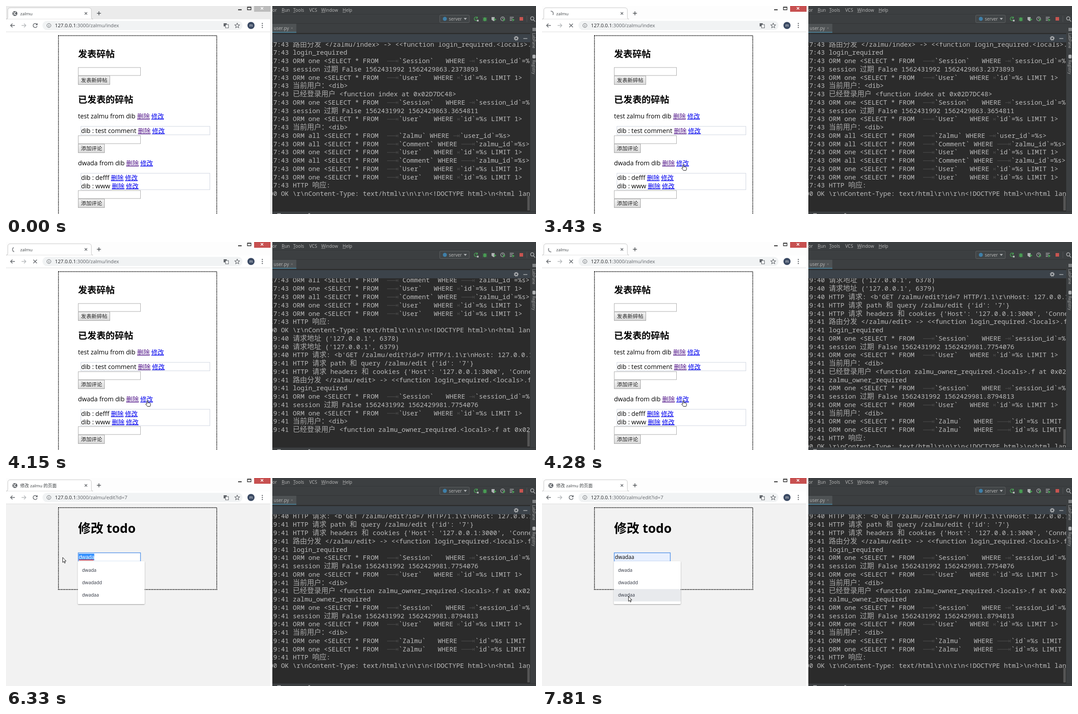
An HTML page that plays this animation: 1192 by 470 pixels, repeating every 8 s.

```html
<!DOCTYPE html>
<html lang="zh-CN">
<head>
<meta charset="utf-8">
<style>
  html, body { margin: 0; width: 100%; height: 100%; overflow: hidden; background: #fff }
  svg { display: block; width: 1192px; height: 470px }
  text { white-space: pre; font-family: "Open Sans", "Noto Sans CJK SC", "Noto Sans CJK", sans-serif }
  .mono { font-family: "Noto Sans Mono", "Noto Sans CJK SC", "Noto Sans CJK", monospace; font-size: 14.6px; fill: #bbb }
  .mono tspan { font-size: 16px; font-weight: 300; fill: #aaa }
  .arial { font-family: "Liberation Sans", Arial, sans-serif }
  .link { text-decoration: underline }
</style>
</head>
<body>
<svg id="stage" viewBox="0 0 1192 470"></svg>
<script>
const $ = id => document.getElementById(id);
const esc = s => s.replace(/&/g, '&amp;').replace(/</g, '&lt;');
const text = (x, y, s, size, fill = '#000', more = '') =>
  `<text x="${x}" y="${y}" font-size="${size}" fill="${fill}" ${more}>${esc(s)}</text>`;
const rect = (x, y, w, h, fill, more = '') =>
  `<rect x="${x}" y="${y}" width="${w}" height="${h}" fill="${fill}" ${more}/>`;
const line = (d, stroke, width = 1, more = '') =>
  `<path d="${d}" fill="none" stroke="${stroke}" stroke-width="${width}" ${more}/>`;
const shape = (d, fill, more = '') => `<path d="${d}" fill="${fill}" ${more}/>`;
const disc = (x, y, r, fill, more = '') => `<circle cx="${x}" cy="${y}" r="${r}" fill="${fill}" ${more}/>`;
const group = (id, body, more = '') => `<g id="${id}" ${more}>${body}</g>`;

// Browser window
const GREY = '#5f6368';
const browser = () =>
  rect(0, 0, 599, 470, '#fdfdfd', 'id="frame"') +
  line('M522 8.5h8', '#222', 2) + line('M543 2.5h8v6h-8zM543 3h8', '#222', 1.3) +
  rect(558, 0, 37, 13, '#c75050', 'id="close"') + line('M573 2.5l5.5 5.5m0-5.5l-5.5 5.5', '#fff', 1.5) +
  shape('M0 30q4 0 4-4V10q0-6 6-6H186q6 0 6 6V26q0 4 4 4z', '#fff', 'stroke="#b4b4b4" stroke-width=".8"') +
  rect(0, 30, 594, 29, '#fff') + line('M0 58.5H594', '#dcdcdc') +
  group('globe', disc(20, 17, 5.6, GREY) + line('M16 15l4 1 2-3M17 20l2-2 4 2', '#fff', 1.5)) +
  group('loader', disc(20, 17, 5.4, 'none', 'stroke="#85888c" stroke-width="1.9" stroke-dasharray="12.2 40"')) +
  text(32, 21, '', 9.8, '#3c4043', 'id="title"') +
  line('M177 14l5.5 5.5m0-5.5l-5.5 5.5', GREY, 1.3) + line('M204.5 16.5h9m-4.5-4.5v9', '#45494d', 1.4) +
  line('M20 44H10.5m4-4.2L10.3 44l4.2 4.2', GREY, 1.5) + line('M35 44h9.5m-4-4.2l4.2 4.2-4.2 4.2', '#b5b8bb', 1.5) +
  group('reload', line('M69.5 41.5a4.6 4.6 0 1 0 .5 4', GREY, 1.5) + shape('M71 38.5v4.7h-4.7z', GREY)) +
  group('stop', line('M61.5 40l8 8m0-8l-8 8', GREY, 1.5)) +
  rect(82, 33.5, 450, 21, '#f1f3f4', 'rx="10.5"') +
  disc(96.5, 44, 4.5, 'none', `stroke="${GREY}"`) + line('M96.5 43.5v3m0-5v1', GREY, 1.2) +
  text(110, 48, '127.0.0.1', 11.2, '#202124') + text(157.3, 48, '', 11.2, GREY, 'id="path"') +
  rect(489.5, 39, 7, 7, GREY) + rect(493.5, 42, 7, 7.5, '#f1f3f4', `stroke="${GREY}"`) +
  line('M520 38.8l1.6 3.5 3.8.4-2.9 2.6.9 3.8-3.4-2-3.4 2 .9-3.8-2.9-2.6 3.8-.4z', GREY, 1.1) +
  disc(551, 44, 8, '#3c4b64') + text(547.3, 47, 'm', 8.5, '#fff') +
  [39.5, 44, 48.5].map(y => disc(576.5, y, 1.3, GREY)).join('');

// Web pages
const link = (x, y, s, visited) => text(x, y, s, 14.2, visited ? '#551a8b' : '#0000ee', 'class="link"');
const entry = (x, y, s, linkX, visited) =>
  text(x, y, s, 14.2) + link(linkX, y, '删除', visited) + link(linkX + 31.7, y, '修改');
const field = y => rect(162.5, y + .5, 140, 18, '#fff', 'stroke="#a9a9a9"');
const button = (y, w, s) =>
  rect(162.5, y + .5, w, 19.5, 'url(#shade)', 'stroke="#a0a0a0"') + text(168.5, y + 14.8, s, 11.9, '#222');
const dotted = h => rect(118, 67, 356, h, 'none', 'stroke="#000" stroke-width="2" stroke-dasharray="1.8 1.8"');
const quote = (y, h) => rect(168.5, y + .5, 290, h, 'none', 'stroke="#cdd4df"');
const heading = (y, s, size) => text(162, y, s, size, '#000', 'font-weight="700"');

const listPage = () => group('list',
  rect(0, 59, 594, 411, '#fff') + dotted(420) +
  heading(116, '发表碎帖', 20.7) + field(138.5) + button(157.5, 71, '发表新碎帖') +
  heading(218.5, '已发表的碎帖', 20.7) +
  entry(162, 254, 'test zalmu from dib', 295, true) +
  quote(271.5, 19) + entry(169, 287, 'dib : test comment', 296.8, true) + field(292.5) + button(311.5, 59, '添加评论') +
  entry(162, 360, 'dwada from dib', 270.3, true) +
  quote(377.5, 37) + entry(169, 393, 'dib : defff', 236, false) + entry(169, 411.5, 'dib : www', 238, false) +
  field(416.5) + button(435.5, 59, '添加评论'));

const choices = ['dwada', 'dwadadd', 'dwadaa'];
const editPage = () => group('edit',
  rect(0, 59, 594, 411, '#f2f2f2') + dotted(185) + heading(124, '修改 todo', 28.4) +
  rect(162.5, 169, 140, 19.5, '#fff', 'id="box"') +
  rect(163.5, 171, 35, 15, '#3390ff', 'id="marked"') +
  text(164, 182.7, 'dwada', 11.9, '#000', 'id="value" class="arial"') +
  line('M164 186' + 'l1.5-1.4 1.5 1.4'.repeat(11), '#e02020', 1.2, 'id="wavy"') +
  text(164, 182.7, '', 11.8, '#000', 'id="preview"') +
  group('menu', rect(161.5, 188, 150.5, 97, '#fff', 'rx="2" filter="url(#shadow)"') +
    rect(161.5, 0, 150.5, 28, '#e8eaed', 'id="hover"') +
    choices.map((s, i) => text(171, 212 + 28.2 * i, s, 10.35, '#2f3440')).join('')));

// IDE window
const queries = {
  S: ['one', 'Session', 989, 1055, '`session_id`=%s LIMIT 1>'],
  U: ['one', 'User', 962, 1021, '`id`=%s LIMIT 1>'],
  A: ['all', 'Zalmu', 953, 1021, '`user_id`=%s>'],
  C: ['all', 'Comment', 971, 1055, '`zalmu_id`=%s>'],
  W: ['one', 'Zalmu', 971, 1055, '`id`=%s LIMIT 1>'],
};
const session = tail => 'session 过期 False 1562431992 15624' + tail;
const user = '当前用户：<dib>', reply = 'HTTP 响应:';
const ok = '00 OK \\r\\nContent-Type: text/html\\r\\n\\r\\n<!DOCTYPE html>\\n<html lang="en">';
const route = page => `路由分发 </zalmu/${page}> -> <<function login_required.<locals>.f`;
const log = [
  route('index'), 'login_required', 'S', session('29863.2373893'), 'U', user,
  '已经登录用户 <function index at 0x02D7DC48>', 'S', session('29863.3654811'), 'U', user,
  'A', 'C', 'U', 'C', 'U', 'U', reply, ok,
  "请求地址 ('127.0.0.1', 6378)", "请求地址 ('127.0.0.1', 6379)",
  "HTTP 请求: <b'GET /zalmu/edit?id=7 HTTP/1.1\\r\\nHost: 127.0.0.1",
  "HTTP 请求 path 和 query /zalmu/edit {'id': '7'}",
  "HTTP 请求 headers 和 cookies {'Host': '127.0.0.1:3000', 'Connection'",
  route('edit'), 'login_required', 'S', session('29981.7754076'), 'U', user,
  '已经登录用户 <function zalmu_owner_required.<locals>.f at 0x02', 'zalmu_owner_required',
  'S', session('29981.8794813'), 'U', user, 'W', 'W', reply, ok,
];
const PITCH = 18.76;
const mono = (x, y, s) => `<text class="mono" x="${x}" y="${y}">` +
  esc(s).replace(/[\u3000-\uffff]+/g, '<tspan>$&</tspan>') + '</text>';
const tabMark = (x1, x2, y) => line(`M${x1} ${y}H${x2}m-3-2.5l3 2.5-3 2.5m4.5-5.5v6`, '#505050');
const logLine = (s, i) => {
  const y = 91.5 + PITCH * i, stamp = i < 19 ? '17:43' : i < 22 ? '19:40' : '19:41';
  if (s === ok) return mono(592.3, y, s);
  let body = mono(645, y, s);
  if (queries[s]) {
    const [kind, table, whereX, colX, col] = queries[s];
    body = mono(645, y, `ORM ${kind} <SELECT * FROM`) + tabMark(857, 880, y - 4.5) +
      mono(883, y, '`' + table + '`') + mono(whereX, y, 'WHERE') +
      tabMark(whereX + 53, colX - 3, y - 4.5) + mono(colX, y, col);
  }
  return mono(592.3, y, stamp) + body;
};
const side = (y, s) => text(0, 0, s, 8.6, '#b0b0b0', `transform="translate(1184 ${y}) rotate(90)"`);
const GREEN = '#499c54', PALE = '#afb1b3';
const ide = () =>
  rect(599, 0, 593, 470, '#3c3f41') +
  [['or', 599], ['Run', 620], ['Tools', 646], ['VCS', 682], ['Window', 709], ['Help', 757]]
    .map(([s, x]) => text(x, 12.8, s, 10, '#bbb')).join('') +
  line('M620 14.5h6m20 0h5m58 0h9m39 0h7', '#bbb', .7) + line('M599 18.5h593', '#333638') +
  rect(975.5, 20.5, 66.5, 17, '#414547', 'rx="2" stroke="#5e6162"') + disc(987, 29, 4.5, '#3f7fa8') +
  text(996, 32.8, 'server', 10, '#bbb') + shape('M1029.5 27h7l-3.5 4.5z', PALE) +
  line('M1060 26a4 4 0 1 0 .5 5', GREEN, 1.6) + shape('M1061 23.5v5h-5z', GREEN) + rect(1059, 31, 4, 4, PALE) +
  `<ellipse cx="1077" cy="30" rx="3.3" ry="4.5" fill="${GREEN}"/>` + line('M1072 26l10 8m0-8l-10 8m0-4h10', GREEN) +
  shape('M1092 25h7v9h-3l-4-3z', PALE) + shape('M1098 27l5 3.5-5 3.5z', GREEN) +
  disc(1117, 29, 4.3, 'none', `stroke="${PALE}" stroke-width="1.3"`) + line('M1117 26v3h2', PALE) +
  shape('M1118 28l5 3.5-5 3.5z', GREEN) +
  line('M1133 25.5h9m-9 3.5h6m-6 3.5h5', PALE, 1.4) + shape('M1139 28l5 3.5-5 3.5z', GREEN) +
  rect(1155, 25, 8, 8, '#c75450') + line('M1171.5 22v14', '#515456') +
  disc(1183.5, 28, 3.7, 'none', `stroke="${PALE}" stroke-width="1.5"`) + line('M1186 31l4 4', PALE, 1.6) +
  line('M599 39.5h593', '#323436') +
  rect(599, 40, 54, 20, '#4e5254') + rect(599, 58.5, 54, 2, '#4a7f96') +
  text(602, 54, 'user.py', 10, '#bbb') + line('M641 48l4 4m0-4l-4 4', '#777') +
  rect(599, 61, 580, 2.5, '#2b2b2b') + rect(599, 63.5, 580, 18.5, '#3c434a') +
  disc(1147.5, 73, 3, 'none', `stroke="${PALE}" stroke-width="2"`) +
  disc(1147.5, 73, 4.6, 'none', `stroke="${PALE}" stroke-width="1.5" stroke-dasharray="1.8 1.8"`) +
  line('M1163.5 73.5h9', PALE, 1.5) +
  rect(599, 82, 580, 382, '#2b2b2b') +
  group('log', group('scroll', log.map((s, i) => group('row' + i, logLine(s, i))).join('')), 'clip-path="url(#console)"') +
  rect(1172.5, 429, 5.5, 33, '#555', 'id="thumb"') +
  line('M1184 50.5h8m-8 2.5h8m-8 2.5h8', PALE, 1.3) + side(61, 'LabPane') +
  rect(1184, 110, 7, 8.5, PALE, 'rx="2"') + side(122, 'Registry') +
  line('M599 464.5h593', '#323436') + rect(610, 468.5, 8, 1.5, PALE) + rect(680, 468.5, 4, 1.5, PALE);

const OUTLINE = 'stroke="#000" stroke-width=".9"';
const cursors =
  group('arrow', shape('M.5.5v11.3l2.6-2.4 1.7 4 1.7-.8-1.7-3.9h3.4z', '#fff', OUTLINE)) +
  group('hand', shape('M-1 8V1q1-1.5 2 0v4l5 1q1 .5 1 2v3l-1 2.5H0L-3.5 9q-.5-2 1.5-1.5z', '#fff', OUTLINE)) +
  group('beam', line('M-2.5-5.5h2l.5.5.5-.5h2M0-5V5.5M-2.5 6h5', '#000'));

$('stage').innerHTML = `<defs>
  <linearGradient id="shade" x2="0" y2="1"><stop stop-color="#f3f3f3"/><stop offset="1" stop-color="#dadada"/></linearGradient>
  <filter id="shadow"><feDropShadow dx="0" dy="1" stdDeviation="1.2" flood-opacity=".4"/></filter>
  <clipPath id="console"><rect x="599" y="82" width="580" height="382"/></clipPath></defs>` +
  browser() + listPage() + editPage() + ide() + group('pointer', cursors);

// Motion
const LOOP = 8000;
const scrolls = [ // time, first row, last row
  [0, 0, 18], [3510, 2, 20], [3590, 3, 21], [3900, 4, 22], [4060, 7, 25],
  [4140, 12, 30], [4210, 15, 33], [4280, 19, 39], [4380, 21, 39],
];
const moves = [ // start, end, steps, x, y
  [220, 910, 10, 311, 389], [1080, 1470, 6, 318, 358], [5240, 6040, 11, 200, 177], [6100, 6180, 2, 118, 172],
  [6330, 6330, 1, 127, 179], [6480, 7270, 11, 203, 243], [7650, 7810, 3, 194, 267],
];
function pointerAt(t) {
  let x = 778, y = 390;
  for (const [start, end, steps, toX, toY] of moves) {
    if (t < start) break;
    const done = t >= end ? 1 : (Math.floor((t - start) / (end - start) * (steps - 1)) + 1) / steps;
    const f = done * done * (3 - 2 * done);
    x += (toX - x) * f;
    y += (toY - y) * f;
  }
  return [x, y];
}
const show = (id, on) => { $(id).style.display = on ? '' : 'none'; };
const set = (id, attrs) => { for (const k in attrs) $(id).setAttribute(k, attrs[k]); };

function draw(t) {
  const active = t >= 2090, edit = t >= 4940, loading = t >= 2340 && !edit;
  set('frame', { fill: active ? '#fdfdfd' : '#ebebeb' });
  set('close', { fill: active ? '#c75050' : '#bcbcbc' });
  show('globe', !loading);
  show('reload', !loading);
  show('loader', loading);
  show('stop', loading);
  set('loader', { transform: `rotate(${-95 - (t - 3430) * .218} 20 17)` });
  $('title').textContent = edit ? '修改 zalmu 的页面' : 'zalmu';
  $('path').textContent = ':3000/zalmu/' + (edit ? 'edit?id=7' : 'index');
  show('list', !edit);
  show('edit', edit);

  const [, top, last] = scrolls.filter(s => s[0] <= t).pop();
  set('scroll', { transform: `translate(0 ${-top * PITCH})` });
  set('thumb', { y: 429 - 3 * (last - top - 18) });
  log.forEach((_, i) => show('row' + i, i >= top && i <= last));

  const [x, y] = pointerAt(t);
  const menu = t >= 6100, focus = t >= 5960;
  const row = menu && x > 161 ? Math.floor((y - 194.5) / 28.2) : -1, hovering = row >= 0;
  show('menu', menu);
  show('hover', hovering);
  set('hover', { y: 194.5 + 28.2 * row });
  set('box', {
    width: hovering ? 126 : 140, fill: hovering ? '#e8f0fe' : '#fff',
    stroke: focus ? '#4d8fe8' : '#a9a9a9', 'stroke-width': focus ? 1.4 : 1,
  });
  show('marked', menu && !hovering);
  show('wavy', focus && !hovering);
  show('value', !hovering);
  set('value', { fill: menu ? '#fff' : '#000' });
  $('preview').textContent = hovering ? choices[row] : '';

  const hand = t < 5240 && y < 368, beam = edit && x > 162 && x < 303 && y > 168 && y < 188;
  show('pointer', t >= 220);
  set('pointer', { transform: `translate(${Math.round(x)} ${Math.round(y)})` });
  show('hand', hand);
  show('beam', beam);
  show('arrow', !hand && !beam);
}
const begin = performance.now();
function tick() {
  draw((performance.now() - begin) % LOOP);
  requestAnimationFrame(tick);
}
tick();
</script>
</body>
</html>
```
